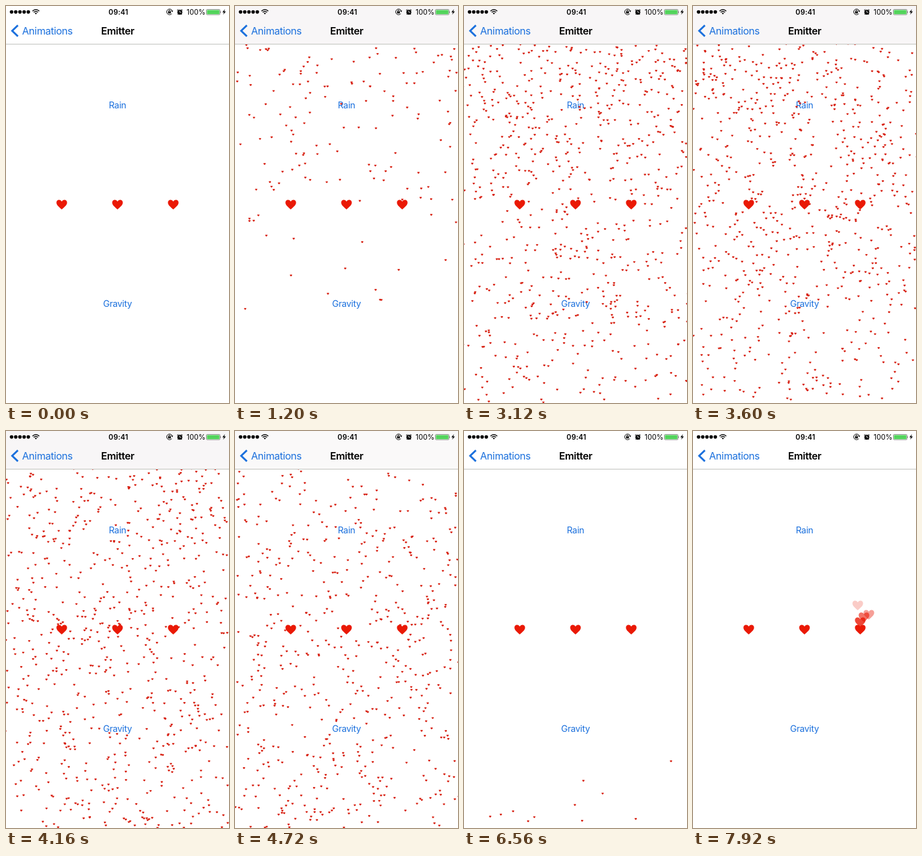
These frames come from a looping animation (360x640 px, 8000 ms). An HTML page with a canvas:

```html
<!DOCTYPE html>
<html lang="en">
<head>
<meta charset="utf-8">
<title>Emitter</title>
<style>
  html, body { margin: 0; width: 100%; height: 100%; overflow: hidden; background: #fff; }
  svg, canvas { position: absolute; left: 0; top: 0; width: 360px; height: 640px; }
  text { font-family: Inter, Roboto, sans-serif; }
  .button { font-size: 14.4px; letter-spacing: -.3px; fill: #1b70dd; text-anchor: middle; }
  .nav { font-size: 16.3px; letter-spacing: -.39px; }
  .status { font-size: 11.5px; }
</style>
</head>
<body>
<svg viewBox="0 0 360 640">
  <text class="button" id="rain" x="180" y="165.3">Rain</text>
  <text class="button" x="180" y="485.3">Gravity</text>
  <g id="hearts" fill="#ea1905"></g>
</svg>
<canvas id="stage" width="360" height="640"></canvas>
<svg viewBox="0 0 360 640">
  <rect width="360" height="61" fill="#fff"/>
  <rect id="tint" width="360" height="61" fill="#f8f6f7"/>
  <rect y="61" width="360" height="1" fill="#bfc1bc"/>

  <g id="signal"></g>
  <g fill="none" stroke="#000" stroke-width="1.5">
    <path d="M42.7 8.2Q48.2 3.2 53.7 8.2M44.7 10.3Q48.2 7.2 51.7 10.3"/>
    <path d="M46.4 11.7Q48.2 10.3 50 11.7L48.2 13.6Z" fill="#000" stroke="none"/>
  </g>
  <text class="status" x="181.5" y="13.8" font-weight="600" text-anchor="middle" letter-spacing=".2">09:41</text>

  <g fill="none" stroke="#000">
    <path d="M268.2 7.5A4.6 4.6 0 1 0 267.6 12.4"/>
    <path d="M266.4 7.6H269.9L268.3 10Z" fill="#000" stroke="none"/>
    <path d="M262.6 9V8A1.3 1.3 0 0 1 265.2 8V9"/>
    <rect x="261.7" y="8.8" width="4.4" height="3.2" fill="#000" stroke="none"/>
  </g>
  <circle cx="280.6" cy="9.9" r="4"/>
  <path d="M276.2 7L278.2 5.4M283 5.4L285 7M278 13L277.2 13.9M283.2 13L284 13.9" stroke="#000"/>
  <path d="M280.6 7.3V10.2H283" stroke="#fff" stroke-width=".8" fill="none"/>
  <text class="status" x="291.6" y="13.8">100%</text>
  <rect x="323.5" y="5.5" width="22" height="8.6" rx="1.4" fill="#fff" stroke="#777" stroke-width=".8"/>
  <rect x="324.4" y="6.4" width="20.2" height="6.8" rx=".6" fill="#53d45c"/>
  <path d="M346.3 8.2Q347.6 9.8 346.3 11.4Z"/>
  <path d="M353.4 5L349.3 10.2H351.9L350.6 14L355 8.7H352.3Z"/>

  <path d="M19.2 31.2L10 40L19.2 48.8" fill="none" stroke="#1b70dd" stroke-width="3"/>
  <text class="nav" x="26" y="45.8" fill="#1b70dd">Animations</text>
  <text class="nav" x="180.3" y="45.8" font-weight="600" text-anchor="middle">Emitter</text>
</svg>
<script>
const LOOP = 8, RAIN_START = .05, SWELL = 5.2, GRAVITY = 160;
const HEART = "M0 8C-3.6 4.4-8.6 1.4-8.6-3C-8.6-5.8-6.7-7.5-4.4-7.5C-2.4-7.5-.8-6.4 0-4.7" +
              "C.8-6.4 2.4-7.5 4.4-7.5C6.7-7.5 8.6-5.8 8.6-3C8.6 1.4 3.6 4.4 0 8Z";
const heart = new Path2D(HEART);
const byId = id => document.getElementById(id);
const ctx = byId("stage").getContext("2d");
const clamp = x => Math.max(0, Math.min(1, x));

byId("hearts").innerHTML = [90, 180, 270]
  .map(x => `<path d="${HEART}" transform="translate(${x} 320)"/>`).join("");
byId("signal").innerHTML = [0, 1, 2, 3, 4]
  .map(i => `<circle cx="${9 + i * 6.75}" cy="9.6" r="2.8"/>`).join("");

let seed = 7;
function random() {
  seed = (seed * 1664525 + 1013904223) % 4294967296;
  return seed / 4294967296;
}

// The birth rate follows half a sine wave, cut off shortly before its end.
const drops = Array.from({ length: 1900 }, () => ({
  born: RAIN_START + SWELL * Math.acos(1 - 1.9 * random()) / Math.PI,
  x: random() * 360,
  vx: (random() - .5) * 24,
  vy: 70 + random() * 510
}));

// Hearts rising from the right button: birth time and velocity.
const risers = [[7.42, -8, -78], [7.545, 37, -64], [7.67, 24, -80], [7.795, 0, -96]];

function drawHeart(x, y, scale, alpha, color) {
  ctx.setTransform(scale, 0, 0, scale, x, y);
  ctx.globalAlpha = alpha;
  ctx.fillStyle = color;
  ctx.fill(heart);
}

function draw(t) {
  ctx.setTransform(1, 0, 0, 1, 0, 0);
  ctx.clearRect(0, 0, 360, 640);

  for (const d of drops) {
    const age = t - d.born;
    if (age < 0) continue;
    const y = d.vy * age + GRAVITY * age * age / 2;
    if (y > 55 && y < 645) drawHeart(d.x + d.vx * age, y, .21, 1, "#d71f10");
  }

  for (const [born, vx, vy] of risers) {
    const age = t - born;
    if (age >= 0) drawHeart(270 + vx * age, 320 + vy * age, 1, clamp(1 - 1.55 * age), "#ea1905");
  }

  byId("tint").setAttribute("opacity", clamp((t - .1) / .8) * clamp((5.2 - t) / .7));
  const pressed = t > 2.22 && t < 2.33;
  const fade = t >= 2.33 ? clamp((t - 2.33) / .3) : 1;
  byId("rain").setAttribute("opacity", pressed ? .2 : .2 + .8 * fade);
}

function frame() {
  draw(performance.now() / 1000 % LOOP);
  requestAnimationFrame(frame);
}
frame();
</script>
</body>
</html>
```
